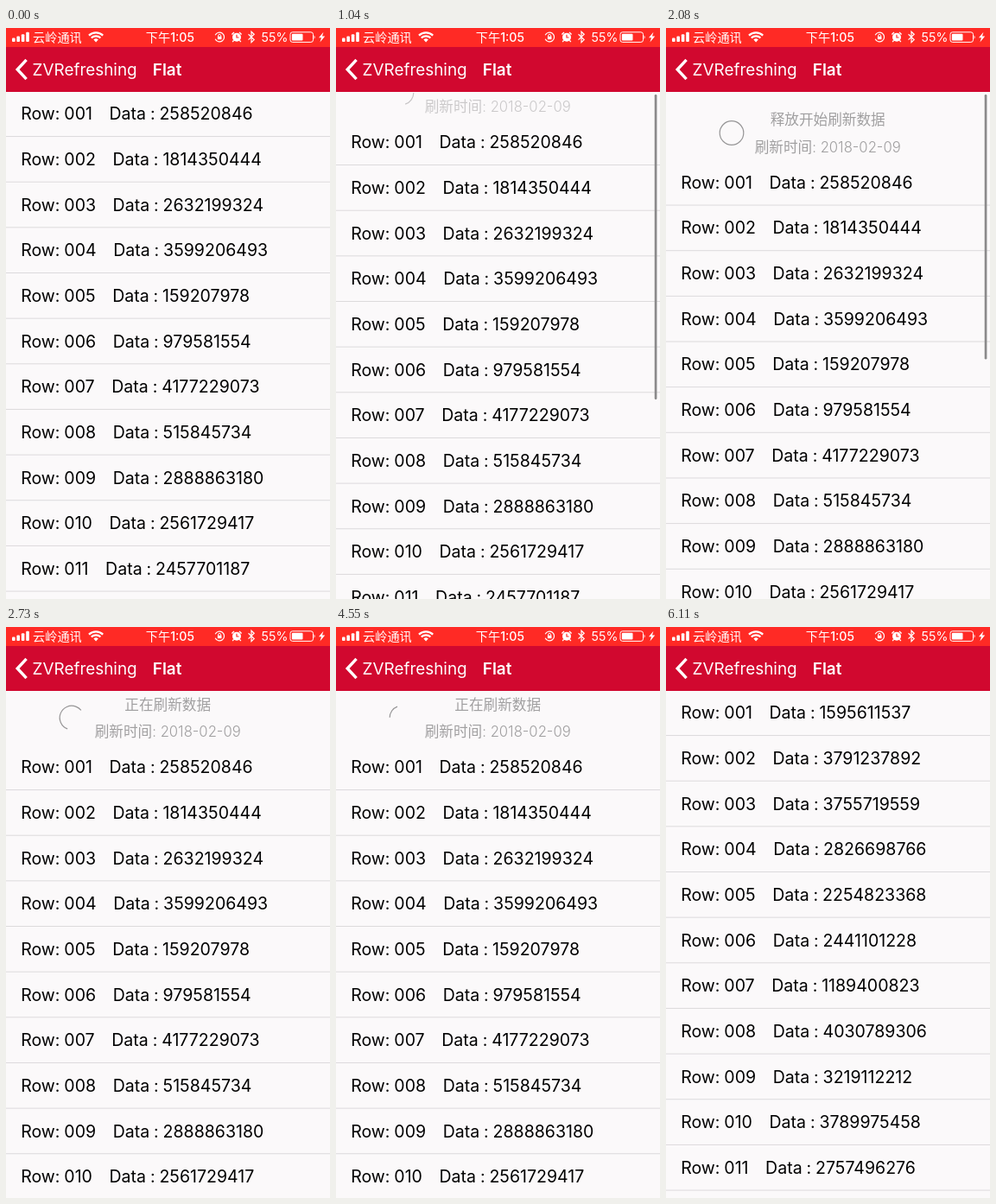
An HTML page for the animation above (6.24 s loop, 375 by 661 pixels).

```html
<!DOCTYPE html>
<html lang="zh-CN">
<head>
<meta charset="utf-8">
<title>Pull to refresh</title>
<style>
  html, body { margin: 0; width: 100%; height: 100%; overflow: hidden; background: #fbf9fa; }
  svg { display: block; }
  text { font-family: Inter, "Noto Sans CJK SC", "Noto Sans CJK", sans-serif; }
  .row { font-size: 19.55px; word-spacing: -.6px; white-space: pre; fill: #000; }
  .rule { fill: #dcdadc; }
  .hint { font-size: 16.65px; font-weight: 300; fill: #a09fa0; text-anchor: middle; }
  .ring { fill: none; stroke: #969596; stroke-width: 1.2; }
  .status { font-size: 14.2px; fill: #fff; }
  .nav { font-size: 18.9px; fill: #fff; }
  .line { fill: none; stroke: #fff; }
</style>
</head>
<body>
<svg width="375" height="661" viewBox="0 0 375 661">
  <rect width="375" height="661" fill="#fbf9fa"/>
  <g id="list"></g>
  <g id="header">
    <circle id="ring" class="ring" r="13.8" pathLength="1"/>
    <text id="hint" class="hint" x="187.2" y="22.6"></text>
    <text class="hint" x="187.2" y="54.1">刷新时间: 2018-02-09</text>
  </g>
  <rect id="bar" x="368.7" y="77" width="2.7" rx="1.35" fill="#8b8a8b"/>

  <rect width="375" height="74" fill="#d1082f"/>
  <rect width="375" height="22" fill="#ff2a25"/>

  <g fill="#fff">
    <rect x="7" y="11.5" width="3.6" height="4.5" rx="1"/>
    <rect x="12.4" y="9.5" width="3.6" height="6.5" rx="1"/>
    <rect x="17.8" y="7.2" width="3.6" height="8.8" rx="1"/>
    <rect x="23.2" y="4.8" width="3.6" height="11.2" rx="1"/>
  </g>
  <text class="status" x="31" y="15.6">云岭通讯</text>
  <g class="line" stroke-width="2.3">
    <path d="M96 8.6a11.6 11.6 0 0 1 16.2 0M98.8 11.5a7.6 7.6 0 0 1 10.6 0"/>
    <path d="M101.4 13.6a4 4 0 0 1 5.4 0L104.1 16.4z" fill="#fff" stroke="none"/>
  </g>
  <text class="status" x="189.9" y="15.6" text-anchor="middle" font-weight="500">下午1:05</text>

  <g class="line" stroke-width="1.2">
    <path d="M242.2 8.3a5.4 5.4 0 1 1 0 4.4"/>
    <path d="M245.7 10V8.9a1.5 1.5 0 0 1 3 0V10" stroke-width="1"/>
    <rect x="244.9" y="9.8" width="4.6" height="3.4" fill="#fff" stroke="none"/>
    <circle cx="267" cy="10.8" r="5" fill="#fff" stroke="none"/>
    <path d="M267 7.8v3.2h2.6" stroke="#ff2a25"/>
    <path d="M261.4 7.6l2.6-2.6M272.6 7.6l-2.6-2.6M263.6 14.4l-1.4 1.6M270.4 14.4l1.4 1.6" stroke-width="1.4"/>
    <path d="M280.6 7.2l6.6 6.4-3.2 3V4.2l3.2 3-6.6 6.4"/>
  </g>
  <text class="status" x="295.6" y="15.6">55%</text>
  <rect class="line" x="329" y="4.8" width="26.5" height="11.6" rx="2.6"/>
  <rect x="330.9" y="6.7" width="12.6" height="7.8" rx="1" fill="#fff"/>
  <path d="M356.6 8.4q2 2.2 0 4.4z" fill="#fff"/>
  <path d="M367.4 4.8l-5.4 6.4h3l-1.6 5.2 5.8-6.8h-3.2z" fill="#fff"/>

  <path class="line" d="M23.6 36.8L13.2 48l10.4 11.2" stroke-width="3.4"/>
  <text class="nav" x="30.6" y="54.8">ZVRefreshing</text>
  <text class="nav" x="169.8" y="54.8" font-weight="600">Flat</text>
</svg>
<script>
const LOOP = 6240, STEP = 130;
const TOP = 73, ROW = 52.65, HEADER = 63;
const RELEASE = 2340, RELOAD = 5850, FINISH = 5980;
const before = '258520846 1814350444 2632199324 3599206493 159207978 979581554 4177229073 515845734 2888863180 2561729417 2457701187'.split(' ');
const after = '1595611537 3791237892 3755719559 2826698766 2254823368 2441101228 1189400823 4030789306 3219112212 3789975458 2757496276'.split(' ');

// [time, pull distance]
const pull = [[650, 0], [780, 4], [1040, 33], [1300, 53], [1560, 64.7], [2080, 79.5],
  [RELEASE, 79.5], [2470, 68], [2600, HEADER], [RELOAD, HEADER], [FINISH, 20], [6110, 0]];

const $ = id => document.getElementById(id);
const list = $('list'), header = $('header'), ring = $('ring'), hint = $('hint'), bar = $('bar');
const clamp = x => Math.min(1, Math.max(0, x));
const ease = x => x * x * (3 - 2 * x);

function add(tag, attrs) {
  const el = document.createElementNS('http://www.w3.org/2000/svg', tag);
  for (const key in attrs) el.setAttribute(key, attrs[key]);
  return list.appendChild(el);
}

const rows = before.map((_, i) => {
  add('rect', { class: 'rule', x: 0, y: TOP + (i + 1) * ROW - .6, width: 375, height: 1 });
  return add('text', { class: 'row', x: 17.2, y: TOP + i * ROW + 33.3 });
});

function fill(data) {
  if (fill.current === data) return;
  fill.current = data;
  rows.forEach((el, i) => {
    el.textContent = `Row: ${String(i + 1).padStart(3, '0')}    Data : ${data[i]}`;
  });
}

function offsetAt(t) {
  const i = pull.findIndex(p => p[0] > t);
  if (i < 1) return 0;
  const [t0, y0] = pull[i - 1], [t1, y1] = pull[i];
  return y0 + (y1 - y0) * (t - t0) / (t1 - t0);
}

function setArc(start, end, turn) {
  ring.setAttribute('stroke-dasharray', `${end - start} 2`);
  ring.setAttribute('transform', `translate(76 32) rotate(${turn + start * 360})`);
}

// The arc grows for two thirds of a cycle, then its start catches up.
function spin(t) {
  const cycles = (t - 2730) / 857 + .767;
  const phase = cycles - Math.floor(cycles);
  const grow = ease(clamp(phase * 1.5)), shrink = ease(clamp(phase * 3 - 2));
  setArc(.25 * grow + .75 * shrink, grow, 322 + (t - 2730) / 2286 * 360);
}

function draw() {
  const t = Math.floor(performance.now() % LOOP / STEP) * STEP;
  const y = offsetAt(t);
  const busy = t >= RELEASE && t < FINISH;

  fill(t < RELOAD ? before : after);
  list.setAttribute('transform', `translate(0 ${y})`);
  header.setAttribute('transform', `translate(0 ${TOP + y - HEADER})`);
  header.setAttribute('opacity', clamp(y / HEADER));
  hint.textContent = busy ? '正在刷新数据' : y >= HEADER ? '释放开始刷新数据' : '下拉开始刷新数据';
  if (busy) spin(t);
  else setArc(0, clamp((y - 21.5) / 57.3), 0);

  bar.setAttribute('height', 386 - y);
  bar.setAttribute('opacity', t < 780 ? 0 : clamp((2730 - t) / 300));
  requestAnimationFrame(draw);
}
draw();
</script>
</body>
</html>
```
